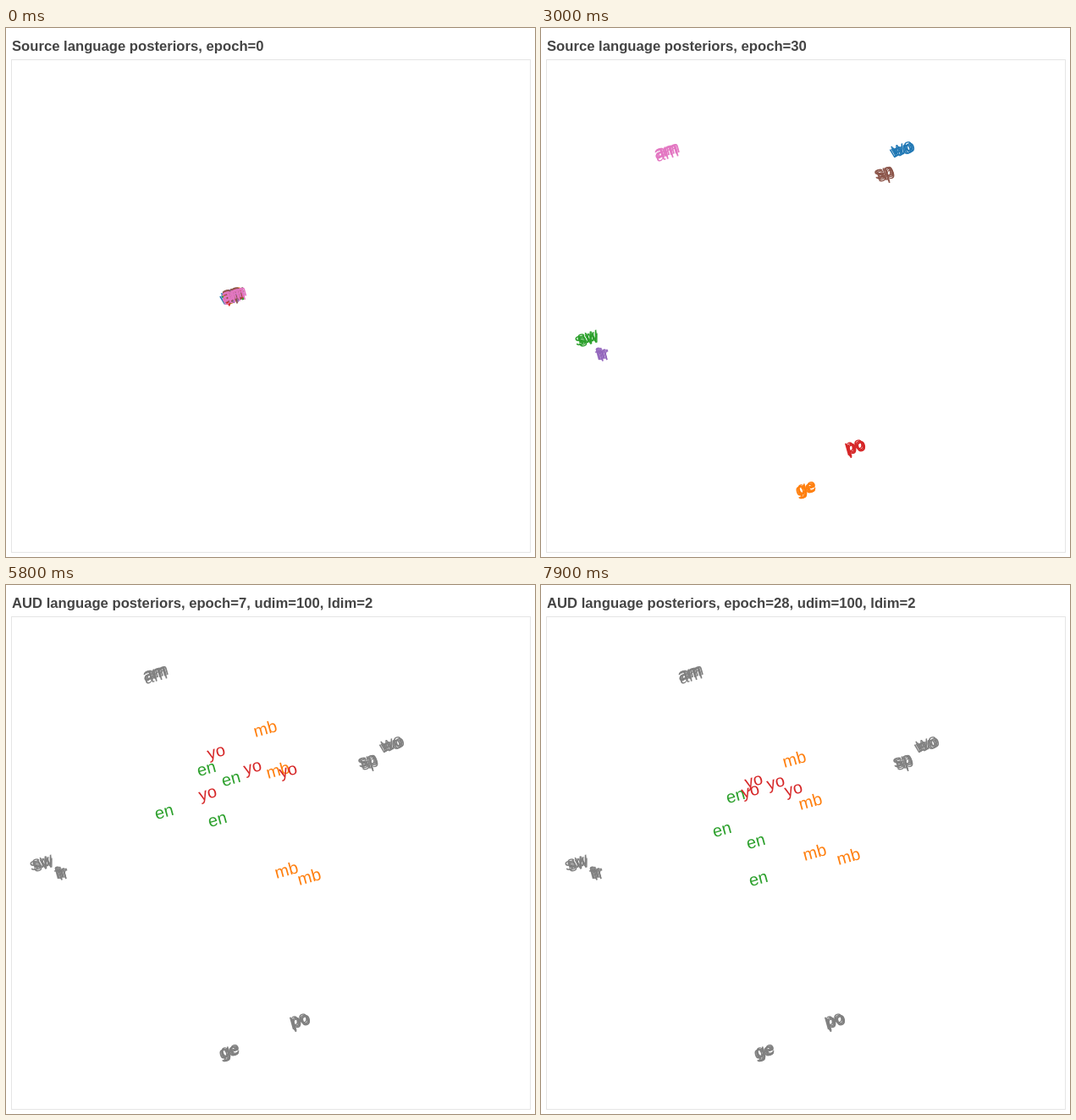
An HTML page with a canvas for the animation above (8 s loop, 625x625 px).

```html
<!DOCTYPE html>
<html lang="en">
<head>
<meta charset="utf-8">
<title>Language posteriors</title>
<style>
html, body { margin: 0; width: 100%; height: 100%; overflow: hidden; background: #fff; }
canvas { display: block; }
</style>
</head>
<body>
<canvas id="stage" width="625" height="625"></canvas>
<script>
const ctx = document.getElementById('stage').getContext('2d');
const FONT = '"Liberation Sans", Arial, Helvetica, sans-serif';
const STEP = 100, FRAMES = 80, SOURCE_FRAMES = 51;
const SAMPLES = 4, SPREAD = 2.6, TILT = -0.27;
const START = [268.5, 316.5];

// Each cluster drifts along a parabola through its places at epochs 13, 30 and 50.
const sources = [
  { text: 'wo', color: '#1f77b4', via: [[400, 135], [428, 143], [457, 188]] },
  { text: 'ge', color: '#ff7f0e', via: [[342, 523], [313, 546], [264, 553]] },
  { text: 'sw', color: '#2ca02c', via: [[84, 340], [54, 367], [42, 329]] },
  { text: 'po', color: '#d62728', via: [[364, 482], [371, 496], [347, 516]] },
  { text: 'fr', color: '#9467bd', via: [[82, 397], [72, 385], [65, 340]] },
  { text: 'sp', color: '#8c564b', via: [[395, 169], [407, 174], [429, 211]] },
  { text: 'am', color: '#e377c2', via: [[154, 190], [148, 147], [176, 106]] }
];

// Each label settles from its place at epoch 7 to its place at epoch 28.
const targets = [
  { text: 'mb', color: '#ff7f0e',
    from: [[306, 169], [321, 218], [331, 336], [358, 344]],
    to: [[299, 205], [318, 255], [323, 315], [363, 320]] },
  { text: 'en', color: '#2ca02c',
    from: [[187, 269], [237, 218], [266, 230], [250, 278]],
    to: [[214, 290], [230, 250], [254, 304], [257, 348]] },
  { text: 'yo', color: '#d62728',
    from: [[249, 200], [292, 218], [334, 222], [239, 249]],
    to: [[252, 234], [278, 236], [299, 244], [248, 246]] }
];

let seed = 7;
const jitter = () => {
  seed = (seed * 16807) % 2147483647;
  return (seed / 2147483647 * 2 - 1) * SPREAD;
};
for (const s of sources) {
  s.offsets = Array.from({ length: SAMPLES }, () => [jitter(), jitter()]);
}

const mix = (a, b, k) => a.map((v, i) => v + (b[i] - v) * k);

function drift([a, b, c], t) {
  const ka = (t - 30) * (t - 50) / (17 * 37);
  const kb = (t - 13) * (50 - t) / (17 * 20);
  const kc = (t - 13) * (t - 30) / (37 * 20);
  return a.map((v, i) => v * ka + b[i] * kb + c[i] * kc);
}

function label(text, [x, y], color) {
  ctx.font = '20px ' + FONT;
  ctx.textAlign = 'center';
  ctx.fillStyle = color;
  const m = ctx.measureText(text);
  ctx.save();
  ctx.translate(x, y);
  ctx.rotate(TILT);
  ctx.fillText(text, 0, (m.actualBoundingBoxAscent - m.actualBoundingBoxDescent) / 2);
  ctx.restore();
}

function drawSources(epoch, color) {
  const grow = 1 - Math.exp(-((epoch / 4.7) ** 1.5));
  for (const s of sources) {
    const [x, y] = mix(START, drift(s.via, epoch), grow);
    for (const [dx, dy] of s.offsets) label(s.text, [x + dx, y + dy], color || s.color);
  }
}

function drawTargets(epoch) {
  const decay = t => 1 - Math.exp(-t / 11);
  const settle = decay(epoch - 7) / decay(21);
  for (const g of targets) {
    g.from.forEach((p, i) => label(g.text, mix(p, g.to[i], settle), g.color));
  }
}

function draw(frame) {
  ctx.fillStyle = '#fff';
  ctx.fillRect(0, 0, 625, 625);
  ctx.strokeStyle = '#e5e5e5';
  ctx.strokeRect(6.5, 37.5, 613, 582);

  const epoch = frame - SOURCE_FRAMES;
  let title;
  if (epoch < 0) {
    title = `Source language posteriors, epoch=${frame}`;
    drawSources(frame);
  } else {
    title = `AUD language posteriors, epoch=${epoch}, udim=100, ldim=2`;
    drawSources(SOURCE_FRAMES - 1, '#808080');
    drawTargets(epoch);
  }
  ctx.font = 'bold 16.67px ' + FONT;
  ctx.textAlign = 'left';
  ctx.fillStyle = '#444';
  ctx.fillText(title, 7, 27);
}

function tick() {
  draw(Math.floor(performance.now() / STEP) % FRAMES);
  requestAnimationFrame(tick);
}
tick();
</script>
</body>
</html>
```
